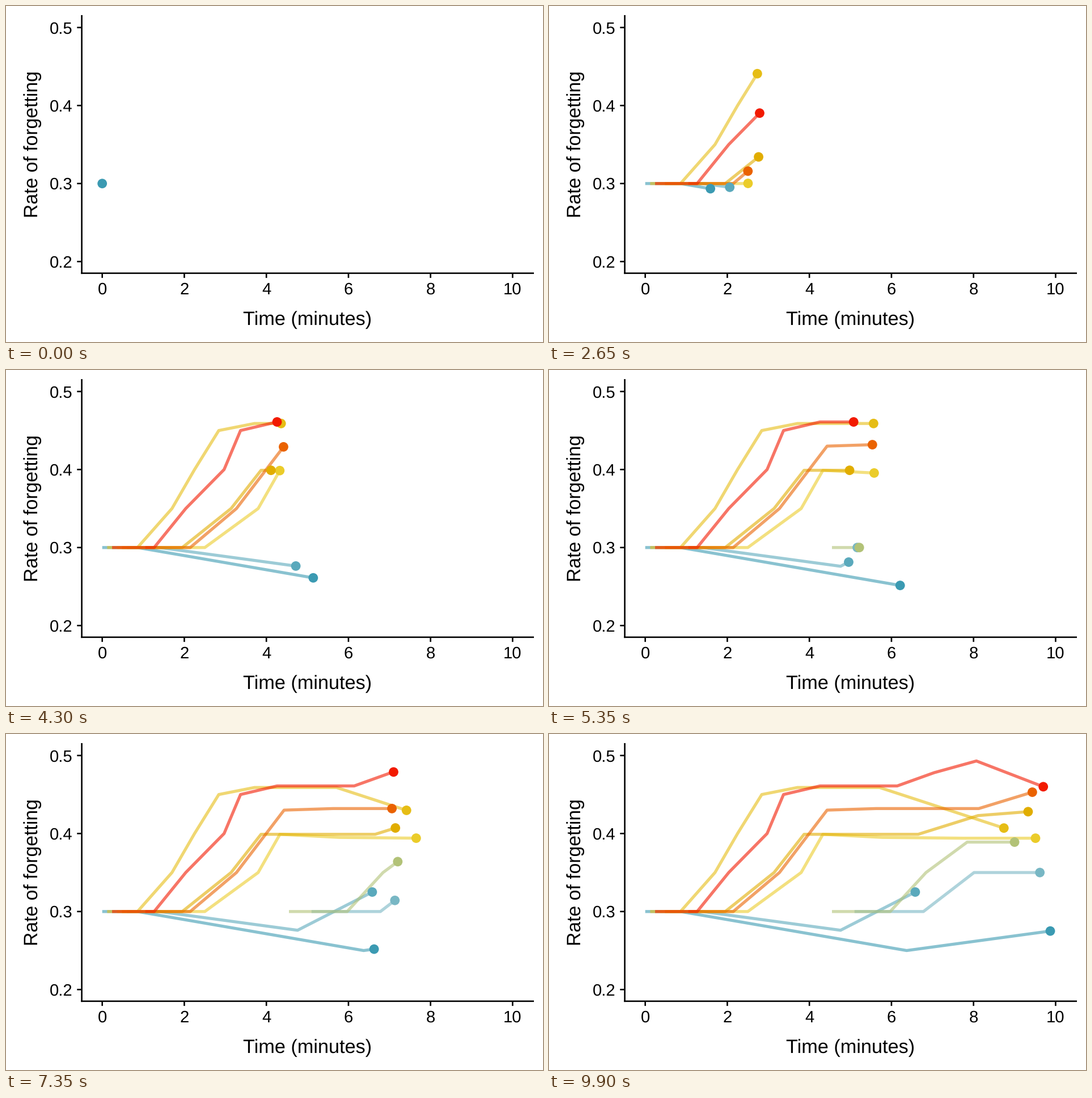
Recreate the animation shown at these times as a matplotlib script. Size 947 by 592 pixels, loop 10000 ms.

```python
import numpy as np
import matplotlib.pyplot as plt
from matplotlib.animation import FuncAnimation
from matplotlib.colors import LinearSegmentedColormap
from matplotlib.patches import Circle

W, H, DPI = 947, 592, 64
FRAMES, INTERVAL = 200, 50
LAST_MINUTE = 9.87
BASE_RATE, STEP = 0.3, 0.05
INTRO_GAP = 0.12  # minutes between the first items

plt.rcParams["font.family"] = "Liberation Sans"
plt.rcParams["text.hinting"] = "none"
palette = LinearSegmentedColormap.from_list(
    "items", ["#3B9AB2", "#78B7C5", "#EBCC2A", "#E1AF00", "#F21A00"])


def stage_x(minute):
    return 169.7 + 72.37 * minute


def stage_y(rate):
    return 312.8 - 1374.5 * (rate - BASE_RATE)


def pt(px):
    return px * 72 / DPI


def intro(order, *reviews):
    """Review times of one of the first items, shown in quick succession."""
    return [order * INTRO_GAP, *reviews]


def growing(start, gap, ratio, count):
    """Review times whose gaps grow by a constant ratio."""
    return start + gap * (ratio ** np.arange(count) - 1) / (ratio - 1)


def course(times, cap=BASE_RATE, wait=2, tail=()):
    """Rate waits, climbs in equal steps to a cap, then follows the tail."""
    count = len(times)
    climb = BASE_RATE + STEP * np.maximum(0, np.arange(count) - wait + 1)
    rates = np.minimum(cap, climb)
    rates[count - len(tail):] = tail
    return np.column_stack([stage_x(np.array(times)), stage_y(rates)])


COURSES = [
    course(intro(0, 0.86, 6.37, 9.87), tail=(0.25, 0.275)),
    course(intro(5, 1.39, 4.76, 6.58), tail=(0.276, 0.325)),
    course(growing(5.1, 0.73, 1.3, 5), cap=0.35, wait=3),
    course(growing(4.55, 0.66, 1.15, 6), cap=0.389, wait=3),
    course(intro(3, 1.39, 2.5, 3.8, 4.33, 5.78, 7.75, 9.51),
           cap=0.399, wait=3, tail=(0.395, 0.394, 0.394)),
    course(intro(1, 0.86, 1.7, 2.25, 2.84, 3.71, 4.37, 5.71, 8.74),
           cap=0.459, tail=(0.407,)),
    course(intro(4, 1.95, 3.14, 3.87, 4.88, 6.65, 8.11, 9.33),
           cap=0.399, tail=(0.423, 0.428)),
    course(growing(1.05, 1.094, 1.03, 8),
           cap=0.35, tail=(0.43, 0.432, 0.432, 0.432, 0.453)),
    course(intro(2, 1.265, 2.035, 2.97, 3.37, 4.26, 4.95, 6.14, 7.04, 8.07, 9.7),
           cap=0.461, tail=(0.478, 0.493, 0.46)),
]


def cubic_in_out(t):
    return 4 * t ** 3 if t < 0.5 else 1 - 4 * (1 - t) ** 3


def revealed(points, now):
    """Corners passed so far, ending in the eased head position."""
    xs = points[:, 0]
    done = int(np.searchsorted(xs, now, side="right"))
    if done == 0 or done == len(points):
        return points[:done]
    a, b = points[done - 1], points[done]
    t = (now - a[0]) / (b[0] - a[0])
    return np.vstack([points[:done], a + (b - a) * cubic_in_out(t)])


fig = plt.figure(figsize=(W / DPI, H / DPI), dpi=DPI, facecolor="white")
ax = fig.add_axes([0, 0, 1, 1])
ax.set_xlim(0, W)
ax.set_ylim(H, 0)
ax.axis("off")


def rule(x0, y0, x1, y1):
    ax.plot([x0, x1], [y0, y1], color="black", lw=pt(2.6), snap=False,
            solid_capstyle="butt", zorder=4)


def label(x, y, text, size, **kw):
    ax.text(x, y, text, fontsize=pt(size), color="black", va="baseline", **kw)


AXIS_X, AXIS_Y, TICK = 133.6, 470.8, 8.3
rule(AXIS_X, 16, AXIS_X, AXIS_Y + 1.3)
rule(AXIS_X - 1.3, AXIS_Y, 931, AXIS_Y)
for minute in range(0, 11, 2):
    x = stage_x(minute)
    rule(x, AXIS_Y, x, AXIS_Y + TICK)
    label(x, 508.2, str(minute), 29.2, ha="center")
for tenth in range(2, 6):
    y = stage_y(tenth / 10)
    rule(AXIS_X - TICK, y, AXIS_X, y)
    label(118, y + 10.4, f"0.{tenth}", 29.2, ha="right")
label(531.7, 562, "Time (minutes)", 34.3, ha="center")
label(56, 243.5, "Rate of forgetting", 33.8, ha="center",
      rotation=90, rotation_mode="anchor")

tracks = []
for i, points in enumerate(COURSES):
    color = palette(i / (len(COURSES) - 1))
    trail, = ax.plot([], [], color=color, alpha=0.6, lw=pt(5.3), zorder=2,
                     snap=False, solid_capstyle="butt", solid_joinstyle="round")
    head = ax.add_patch(Circle((0, 0), 8.4, color=color, lw=0, zorder=3))
    tracks.append((points, trail, head))


def draw(frame):
    now = stage_x(frame * LAST_MINUTE / (FRAMES - 1))
    for points, trail, head in tracks:
        path = revealed(points, now)
        trail.set_data(path[:, 0], path[:, 1])
        head.set_visible(len(path) > 0)
        if len(path):
            head.center = path[-1]
    return [artist for track in tracks for artist in track[1:]]


anim = FuncAnimation(fig, draw, frames=FRAMES, interval=INTERVAL,
                     init_func=lambda: draw(0), repeat=True, repeat_delay=0)
plt.show()
```
